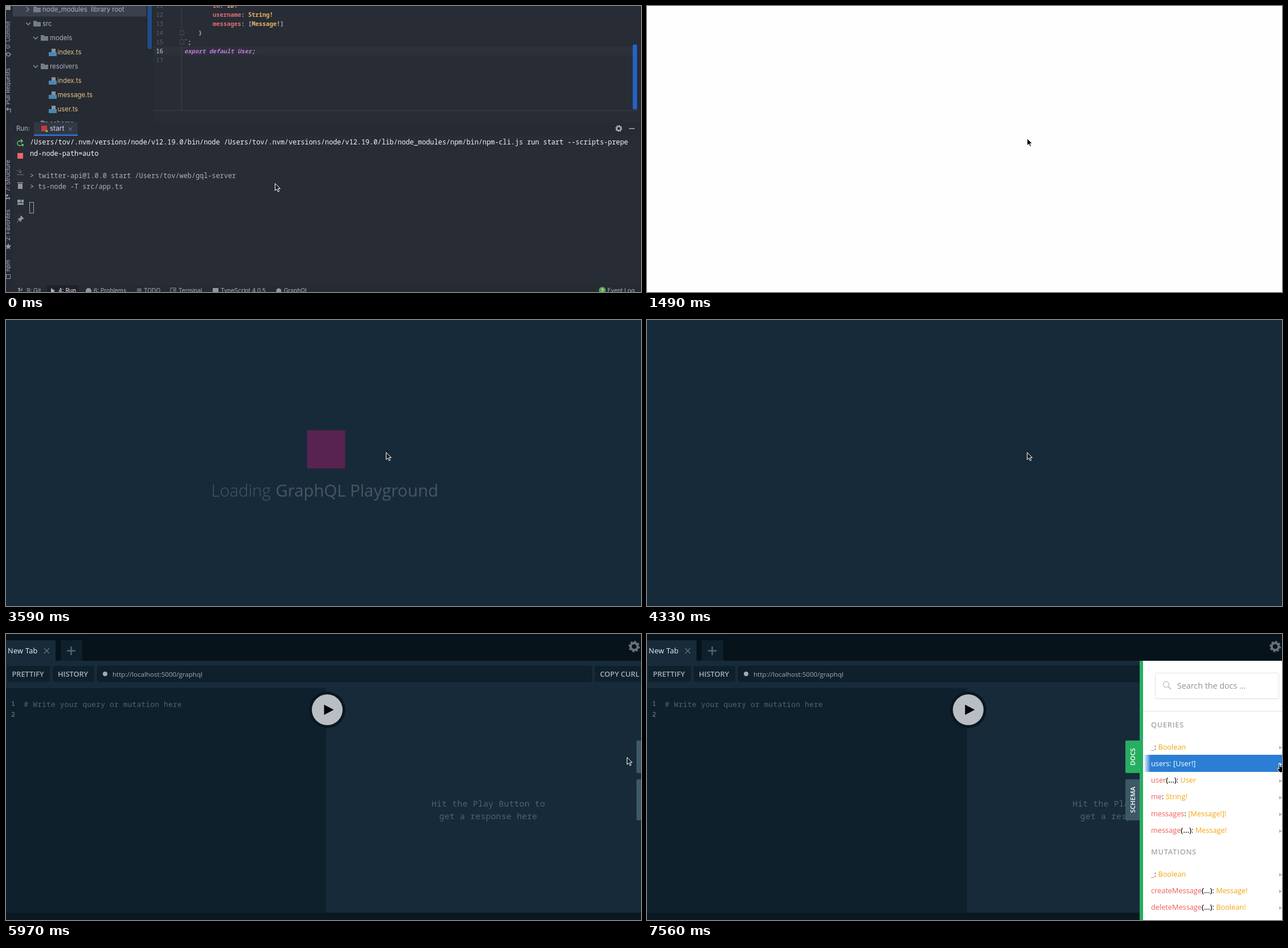
Recreate the animation shown at these times as an HTML page. Size 1115 px wide and 502 px high, loop 8000 ms.

```html
<!DOCTYPE html>
<html lang="en">
<head>
<meta charset="utf-8">
<title>Starting a GraphQL server</title>
<style>
html, body { margin: 0; height: 100%; overflow: hidden; background: #282c34; }
svg { display: block; }
text { white-space: pre; }
.ui { font-family: Inter, sans-serif; font-size: 11.4px; fill: #abb2bf; }
.file { fill: #e2c285; }
.code { font: 600 10.4px "Noto Sans Mono", monospace; fill: #abb2bf; }
.num { font-weight: 400; fill: #59606d; text-anchor: end; }
.term { font: 500 11.84px "Noto Sans Mono", monospace; fill: #abb2bf; }
.command { fill: #f6f7f8; }
.web { font-family: "Open Sans", sans-serif; font-size: 12.74px; }
.query { font: 12.74px "Noto Sans Mono", monospace; letter-spacing: .28px; fill: #53636e; }
.row { font-size: 11.5px; fill: #7a8891; }
.hint { font-size: 14.5px; letter-spacing: .37px; text-anchor: middle; }
.btn { font-weight: 600; fill: #a9b1b7; }
.head { font-weight: 600; letter-spacing: .75px; fill: #a6a6a6; }
.loading { font-size: 29.3px; fill: #fff; fill-opacity: .6; }
.line { fill: none; stroke: #9097a3; stroke-width: 1.3; }
</style>
</head>
<body>
<svg id="stage" width="1115" height="502" viewBox="0 0 1115 502"></svg>
<script>
const stage = document.getElementById('stage');
const text = (x, y, s, cls, more = '') => `<text x="${x}" y="${y}" class="${cls}" ${more}>${s}</text>`;
const rect = (x, y, w, h, fill, more = '') => `<rect x="${x}" y="${y}" width="${w}" height="${h}" fill="${fill}" ${more}/>`;
const path = (d, more = 'class="line"') => `<path d="${d}" ${more}/>`;
const circle = (x, y, r, more) => `<circle cx="${x}" cy="${y}" r="${r}" ${more}/>`;
const span = (fill, s, more = '') => `<tspan fill="${fill}" ${more}>${s}</tspan>`;
const group = (id, body) => `<g id="${id}">${body}</g>`;
const solid = color => `fill="${color}"`;
const stroke = (color, width = 1.3) => `fill="none" stroke="${color}" stroke-width="${width}"`;

const gear = (x, y, r, color) => circle(x, y, r * .62, stroke(color, r * .42)) +
  circle(x, y, r * .87, stroke(color, r * .27) + ' pathLength="16" stroke-dasharray="1"');

// ---- editor window ----
function treeRow(y, depth, name, file) {
  const x = 38 + depth * 13;
  if (file) return rect(x + 16, y - 6, 7, 6, '#8b929d') + rect(x + 11, y, 14, 7, '#4a88b5') +
    text(x + 26.5, y + 4, name, 'ui file');
  const chevron = name.startsWith('node') ? `M${x - 2} ${y - 4}l4 4l-4 4` : `M${x - 3} ${y - 2}l4 4l4-4`;
  return path(chevron) + path(`M${x + 10} ${y - 5}h5l2 2h6v8h-13z`, solid('#757c89')) +
    text(x + 26, y + 4, name, 'ui');
}
const tree = [['node_modules  library root', 0], ['src', 0], ['models', 1], ['index.ts', 2, 1],
  ['resolvers', 1], ['index.ts', 2, 1], ['message.ts', 2, 1], ['user.ts', 2, 1], ['schema', 1]]
  .map(([name, depth, file], i) => treeRow(6 + i * 25, depth, name, file)).join('');

const RED = '#e06c75', YELLOW = '#e5b567';
const field = (name, type) => span(RED, name) + ': ' + type;
const codeLines = [
  [363, field('id', span(YELLOW, 'ID!'))],
  [363, field('username', span(YELLOW, 'String!'))],
  [363, field('messages', `[${span(YELLOW, 'Message')}!]`)],
  [338, '}'],
  [313, '`;'],
  [313, span('#c678dd', 'export default User') + ';', 'style="font-style:italic"'],
  [313, '']
].map(([x, s, more], i) => {
  const y = 2.5 + i * 16;
  return text(276, y, i + 11, 'code num', i === 5 ? 'style="fill:#d0d4db"' : '') + text(x, y, s, 'code', more);
}).join('');

const side = [['0: Commit', 75], ['Pull Requests', 173], ['7: Structure', 325], ['2: Favorites', 412], ['npm', 466]]
  .map(([s, y]) => text(0, 0, s, 'ui', `transform="translate(7 ${y}) rotate(-90)" style="font-size:10px"`)).join('') +
  rect(0, 0, 8, 7, '#8a919d') + circle(4, 85, 3, 'class="line"') + path('M0 85h1M7 85h2M8 187V181H1l3-3M1 181l3 3') +
  rect(0, 331, 4, 3, '#9097a3') + rect(0, 336, 3, 3, '#9097a3') + rect(4, 336, 3, 3, '#9097a3') +
  path('M4 416l1.5 4h4l-3 3 1 4-3.5-2-3.5 2 1-4-3-3h4z', solid('#9097a3')) + rect(.5, 471.5, 7, 7, 'none', 'stroke="#9097a3"');

const status = [[36, '9: Git'], [92, '4: Run', '#f0f2f5'], [154, '6: Problems'], [242, 'TODO'], [303, 'Terminal'],
  [377, 'TypeScript 4.0.5'], [488, 'GraphQL'], [1056, 'Event Log']]
  .map(([x, s, c = '#abb2bf']) => text(x, 503, s, 'ui', `style="font-size:10.2px;fill:${c}"`)).join('') +
  path('M23 495v7M21 497l2-2 2 2M28 495v4h-4M230 497h8M230 500h8M294 497l2 2-2 2') +
  path('M79 495l7 5-7 5z', solid('#abb2bf')) + circle(145, 500, 5, solid('#9097a3')) +
  rect(289, 495, 9, 8, 'none', 'stroke="#9097a3"') + rect(363, 495, 10, 9, '#9097a3') +
  circle(479, 500, 4.5, solid('#9097a3')) + circle(1047, 499, 6, solid('#57a64a')) +
  text(1044.5, 503, '2', 'ui', 'style="font-size:9px;fill:#fff"');

const tools = path('M28 237h-4a4 4 0 0 0 0 8h2M26 234l3 3-3 3', stroke('#5fad65', 1.8)) +
  rect(27, 242, 4, 4, '#5fad65') + rect(20, 258, 10, 10, '#f0626c') +
  path('M19 296h12M25 286v7M22 290l3 3 3-3M19 289h3', stroke('#59606c')) +
  rect(21, 312, 8, 9, '#9097a3') + rect(20, 309.5, 10, 1.5, '#9097a3') +
  rect(20, 340, 6, 5, '#9097a3') + rect(27, 340, 4, 5, '#9097a3') + rect(20, 346, 11, 3, '#9097a3') +
  path('M26 368l5 5-2 .5-3 3 0 2-5-5 2 0 3-3zM23 376l-4 4', 'fill="#9097a3" stroke="#9097a3"');

const rocket = path('M54 350q-6 0-9 6l3 3q6-3 6-9z', solid('#d8dbe0')) +
  path('M47 353l-4 2 2 2zM51 357l-2 4-2-2z', solid('#d9434e')) +
  path('M44 358l2 2-5 3z', solid('#f2a33a')) + circle(50.5, 353.5, 1.2, solid('#3c8fd0'));

const home = '/Users/tov';
const node = home + '/.nvm/versions/node/v12.19.0';
const ide = rect(0, 0, 1115, 502, '#282c34') + rect(0, 0, 259, 204, '#262a32') + rect(12, 0, 234, 18.5, '#3a404c') +
  tree + rect(248.5, -5, 7.5, 80.5, '#224b8c', 'rx="2"') +
  rect(259, 71, 842, 16, '#2c313a') + codeLines + rect(308, 0, 1, 183, '#3b404a') +
  [47, 63].map(y => rect(305.5, y - 3.5, 7, 7, '#282c34', 'stroke="#454b56"')).join('') +
  rect(1100.5, 67.5, 7.5, 114, '#2563c9', 'rx="2"') + rect(259, 183, 851, 1, '#39414f') +
  rect(0, 204, 1115, 24, '#262a32') + rect(49, 204, 77, 22, '#323844') + rect(49, 225.5, 77, 2.5, '#2f72dc') +
  rect(0, 228, 13, 274, '#262a32') + rect(0, 490, 1115, 12, '#262a32') + rect(72, 490, 56, 12, '#1e2228') +
  text(18, 219, 'Run:', 'ui') + rect(62, 210, 10, 10, '#cb3837') + circle(71.5, 219.5, 2, solid('#5fd068')) +
  text(77, 219, 'start', 'ui', 'style="font-size:11.8px;fill:#d4d8df"') +
  path('M110 213l6 6M116 213l-6 6', 'stroke="#7d8491"') + gear(1076, 215, 6, '#a5abb6') + rect(1094, 214.5, 10, 1.5, '#a5abb6') +
  side + tools + status +
  text(42, 243, `${node}/bin/node ${node}/lib/node_modules/npm/bin/npm-cli.js run start --scripts-prepe`, 'term command') +
  text(42, 262.5, 'nd-node-path=auto', 'term command') +
  text(42, 301.5, `&gt; twitter-api@1.0.0 start ${home}/web/gql-server`, 'term') +
  text(42, 321, '&gt; ts-node -T src/app.ts', 'term') +
  group('ready', rocket + text(63.3, 360, 'Server ready at ' +
    span('#35b0ba', 'http://localhost:5000/graphql', 'text-decoration="underline"'), 'term')) +
  rect(41.5, 344.5, 7, 19, 'none', 'id="prompt" stroke="#9da3ae"') +
  rect(437.5, 72, 2, 14, '#528bff', 'id="codeCaret"');

// ---- browser: loader and playground ----
const loading = group('logo', rect(528.5, 193.5, 67, 67, '#d9177f', 'rx="2"') +
  text(360.5, 310, 'Loading', 'web loading', 'font-weight="300"') +
  text(473.5, 310, 'GraphQL Playground', 'web loading'));

const DARK = '#0f202d', BASE = '#172a3a';
const playground = rect(0, 0, 1115, 47, '#07131b') + rect(0, 11, 87, 40, '#172b3a', 'rx="2"') +
  rect(96, 11, 38, 36, DARK, 'rx="2"') + rect(0, 47, 1115, 48, '#172b3a') +
  text(3, 34, 'New Tab', 'web', 'fill="#f1f3f4" letter-spacing=".3"') +
  path('M67 25l9 9M76 25l-9 9', stroke('#65727c')) +
  path('M107 29.5h15M114.5 22v15', stroke('#55636d', 2.5)) + gear(1103, 22, 10, '#656f77') +
  rect(2, 56, 75, 28, DARK, 'rx="2"') + text(10.5, 74.5, 'PRETTIFY', 'web btn') +
  rect(82, 56, 73, 28, DARK, 'rx="2"') + text(91, 74.5, 'HISTORY', 'web btn') +
  rect(160.5, 56.5, 868, 27, DARK, 'rx="3" stroke="#0a1720"') +
  rect(1034, 56, 90, 28, DARK, 'rx="2"') + text(1043, 74.5, 'COPY CURL', 'web btn') +
  text(187, 74.5, 'http://localhost:5000/graphql', 'web', 'fill="#a2abb1" style="font-size:11.6px"') +
  group('dot', circle(174, 70, 4, solid('#a2abb1'))) +
  group('reload', path('M178 67a5 5 0 1 0 .8 5M179 64.5v3.5h-3.5', stroke('#a2abb1'))) +
  rect(0, 95, 562, 394, DARK) + rect(562, 95, 553, 394, BASE) + rect(0, 489, 1115, 13, '#0a1822') +
  text(9, 126, '1', 'query row') + text(9, 145, '2', 'query row') +
  text(31.5, 127.5, '# Write your query or mutation here', 'query') +
  rect(31, 113, 1, 19, '#c4cad0', 'id="queryCaret"') +
  text(847, 303, 'Hit the Play Button to', 'query hint') + text(847, 324.5, 'get a response here', 'query hint') +
  circle(564, 133, 32, solid('#0a1720')) + circle(564, 133, 27, solid('#b9bec5')) + path('M558.5 124v18l17-9z', solid('#000'));

const sideTab = (y, h, s, more) => path(`M865 ${y}h-23q-2 0-2 2v${h - 4}q0 2 2 2h23z`, more) +
  text(0, 0, s, 'web', `fill="#fff" text-anchor="middle" style="font-weight:600;font-size:11.3px" transform="translate(857 ${y + h / 2}) rotate(-90)"`);
const tabs = group('tabs', sideTab(187, 57, 'DOCS', 'id="docsTab"') + sideTab(255, 72, 'SCHEMA', solid('#3d5866')));

function docRow(y, name, type, hasArgs, active) {
  const [c1, c2, c3] = active ? ['#fff', '#fff', '#fff'] : ['#f25c54', '#111', '#f5a30f'];
  const args = hasArgs ? span(c2, '(...)', 'font-weight="600"') : '';
  return text(885, y + 4.5, span(c1, name) + args + span(c2, ': ') + span(c3, type), 'web') +
    path(`M1110 ${y - 1.5}v6l5-3z`, solid(active ? '#fff' : '#b5b5b5'));
}
const queries = [['_', 'Boolean'], ['users', '[User!]'], ['user', 'User', 1], ['me', 'String!'],
  ['messages', '[Message!]!'], ['message', 'Message!', 1]];
const mutations = [['_', 'Boolean'], ['createMessage', 'Message!', 1], ['deleteMessage', 'Boolean!', 1]];
const docRows = (top, list) => list.map((row, i) => docRow(top + i * 29.3, ...row)).join('');
const docs = group('docs', rect(865, 47, 6, 455, '#27ae60') + rect(871, 47, 244, 455, '#fff') +
  rect(892.5, 69.5, 217, 45, '#ededed', 'rx="2"') + rect(892.5, 68.5, 217, 45, '#fff', 'rx="2" stroke="#e2e2e2"') +
  circle(911.5, 88.5, 5, stroke('#a8a8a8', 1)) + path('M915 92l5 5', stroke('#a8a8a8')) +
  text(931, 96, 'Search the docs ...', 'web', 'fill="#929292" style="font-size:14.3px"') + rect(871, 135, 244, 1, '#dfdfdf') +
  text(885, 164, 'QUERIES', 'web head') + docRows(198, queries) +
  text(885, 387, 'MUTATIONS', 'web head') + docRows(421, mutations) +
  group('hover', rect(872, 212, 243, 30, 'url(#fade)') + docRow(227.3, 'users', '[User!]', 0, true)));

const cursors = group('arrow', path('M.5.5V13l3-2.7 2.2 4.7 2-.9-2.1-4.5h4z', 'stroke="#fff"')) +
  group('hand', path('M3 1q1.5-1 2 .5l.8 4.5q2-1 2.5.2q2-.6 2.3.8q2 0 2 2.5l-.5 3-1.2 3.5H5L1 10.5Q0 8.5 2.5 9L4 10z', 'fill="#000" stroke="#fff"'));

stage.innerHTML = `<defs><linearGradient id="fade"><stop stop-color="#fff"/>` +
  `<stop offset=".05" stop-color="#2a7ed3"/><stop offset="1" stop-color="#2a7ed3"/></linearGradient></defs>` +
  group('ide', ide) + group('blank', rect(0, 0, 1115, 502, '#fefefe')) +
  group('web', rect(0, 0, 1115, 502, BASE) + loading + group('playground', playground + tabs + docs)) + group('cursor', cursors);

// ---- timeline ----
const LOOP = 8000;
const el = Object.fromEntries([...stage.querySelectorAll('[id]')].map(e => [e.id, e]));
const show = (id, on) => { el[id].style.display = on ? '' : 'none'; };
const between = (t, a, b) => t >= a && t < b;
// Last key whose time has been reached.
const at = (t, keys) => keys.filter(k => k[0] <= t).pop();

const pointer = [[0, 472, 311], [600, 425, 329], [740, 382, 351], [890, 366, 355], [1040, 361, 355],
  [1340, 365, 355], [1490, 667, 232], [5370, 1046, 214], [5970, 1090, 216], [6230, 1106, 227]];
const loaderFade = [[0, .34], [3830, .78], [4120, 1]];
const pageFade = [[0, .3], [4980, 1]];

function draw(t) {
  show('ide', t < 1490);
  show('ready', t >= 150);
  el.prompt.setAttribute('y', t < 150 ? 344.5 : 364.5);
  show('codeCaret', between(t, 450, 740) || t >= 1340);

  show('blank', between(t, 1490, 3590));
  show('web', t >= 3590);
  const fade = at(t, loaderFade)[1];
  show('logo', t < 4330);
  el.logo.setAttribute('opacity', fade);
  el.logo.setAttribute('transform', `translate(0 ${10 * (fade - .34)})`);

  show('playground', t >= 4660);
  el.playground.setAttribute('opacity', at(t, pageFade)[1]);
  show('queryCaret', between(t, 5370, 5970) || between(t, 6560, 7190));
  const reloading = between(t, 6560, 6860);
  show('reload', reloading);
  show('dot', !reloading);

  const open = t >= 7350;
  show('docs', open);
  show('hover', t >= 7560);
  el.docsTab.setAttribute('fill', open ? '#27ae60' : '#3d5866');
  el.tabs.setAttribute('transform', `translate(${open ? 0 : 267} 0)`);

  const [, x, y] = at(t, pointer);
  const hand = between(t, 1040, 1340) || t >= 6560;
  show('hand', hand);
  show('arrow', !hand);
  el.cursor.setAttribute('transform', `translate(${x} ${y})`);
  el.arrow.setAttribute('fill', between(t, 1490, 3590) ? '#000' : '#1c2026');
}

const start = performance.now();
function tick() {
  draw((performance.now() - start) % LOOP);
  requestAnimationFrame(tick);
}
tick();
</script>
</body>
</html>
```
